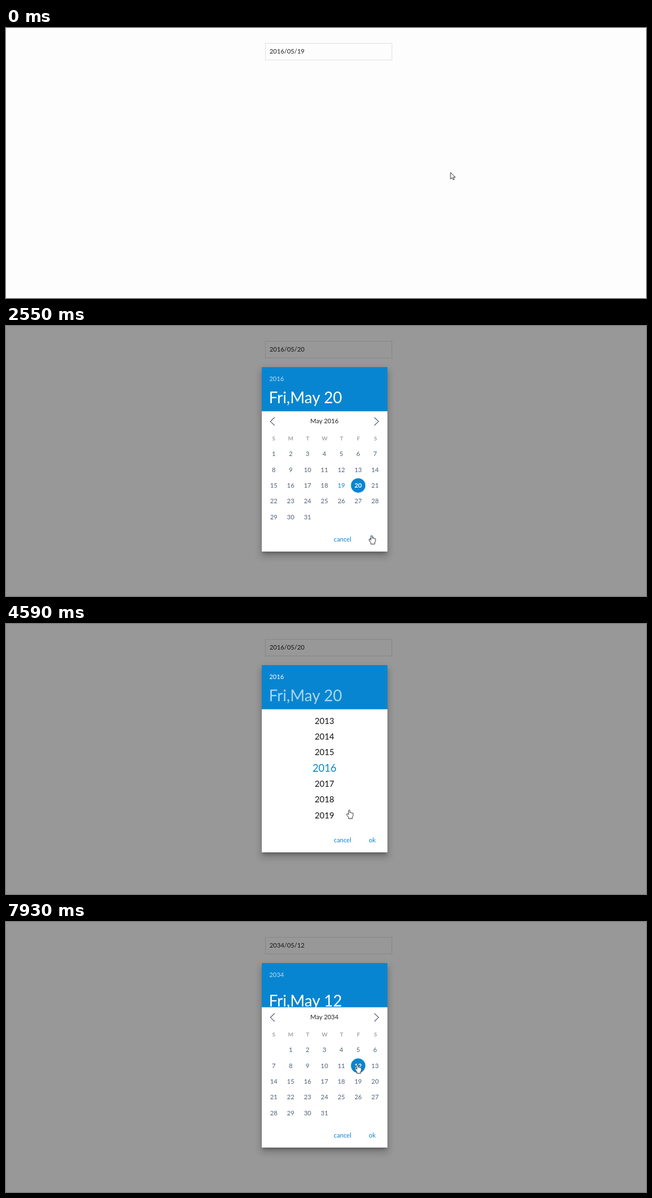
Recreate the animation shown at these times as an HTML page. Size 1151 by 486 pixels, loop 8000 ms.

```html
<!DOCTYPE html>
<html lang="en">
<head>
<meta charset="utf-8">
<title>Date picker</title>
<style>
:root { --blue: #0885d1; --slate: #4d5f7a; }
html, body { margin: 0; width: 100%; height: 100%; overflow: hidden; background: #fdfdfd; }
body { position: relative; font: 11.35px Lato, "Open Sans", sans-serif; }
svg, .layer { position: absolute; left: 0; top: 0; width: 1151px; height: 486px; }
svg text { white-space: pre; }

/* Every track shares one 8 s loop; 1% is 80 ms */
.a { animation: 8s step-end infinite; }
.smooth { animation-timing-function: linear; }

.field { fill: none; stroke: #dfdfdf; }
.focus { fill: none; stroke: #66afe9; animation-name: focus; }
.caret { stroke: #111; animation-name: caret; }
.value { fill: #222; }

.layer { background: rgba(0, 0, 0, .4); animation-name: layer; }
.card {
  position: absolute; left: 460px; top: 74px; width: 226px; height: 332px; background: #fff;
  box-shadow: 0 5px 6px -2px rgba(0, 0, 0, .28), 0 7px 13px 3px rgba(0, 0, 0, .18);
  transform-origin: 112.7px 166px; animation: card 8s linear infinite, height 8s step-end infinite;
}
.card svg { width: 226px; height: 337px; }

.head, .dot { fill: var(--blue); }
.year { fill: #fff; }
.date { font-size: 28.3px; fill: #fff; }
.yearBox { animation-name: yearBox; }
.dateBox { animation-name: dateBox; }

.foot { fill: var(--blue); animation-name: foot; }
.days { animation-name: days; }
.years { animation-name: years; }
.list { animation-name: scroll; }
.list text { font-size: 15px; fill: #111; text-anchor: middle; }
.list .y2016 { font-size: 18.5px; fill: var(--blue); }
.list .y2034 { animation-name: pickYear; }

.chevron { fill: none; stroke: #47536a; stroke-width: 1.1; }
.month text { fill: var(--slate); text-anchor: middle; }
.month .title { fill: #222; }
.month .week { font-size: 10px; font-weight: 700; fill: #a3a3a3; }
.dot { transform-box: fill-box; transform-origin: center; }

.first { animation-name: first; }
.second { animation-name: second; }
.third { animation-name: third; }
.fourth { animation-name: fourth; }
.old { animation-name: old; }
.new { animation-name: new; }

.cursor { animation-name: move; animation-timing-function: ease-in-out; }
.arrow, .hand { fill: #fff; stroke: #222; stroke-linejoin: round; }
.beam { fill: none; stroke: #222; animation-name: beam; }
.arrow { animation-name: arrow; }
.hand { animation-name: hand; }

@keyframes focus { 0%, 23.75%, 54.75% { opacity: 0 } 13.625%, 41.5% { opacity: 1 } }
@keyframes caret { 0%, 20%, 48.5% { opacity: 0 } 13.625%, 41.5% { opacity: 1 } }
@keyframes layer {
  0%, 14% { opacity: 0 } 17.5%, 33.75% { opacity: 1 } 35.75%, 37.12% { opacity: .11 }
  37.125%, 42% { opacity: 0 } 43.375%, 44.87% { opacity: .57 } 44.875% { opacity: .93 } 45.625%, 100% { opacity: 1 }
}
@keyframes card {
  0%, 14% { transform: scale(1.1) } 17.5%, 33.75% { transform: none } 35.75%, 37.12% { transform: scale(1.089) }
  37.125%, 42% { transform: scale(1.1) } 43.375%, 44.87% { transform: scale(1.04) }
  44.875% { transform: scale(1.007) } 45.625%, 100% { transform: none }
}
@keyframes height { 0%, 90% { height: 332px } 54.75% { height: 337px } }
@keyframes foot { 0%, 90% { transform: none } 54.75% { transform: translateY(5px) } }
@keyframes yearBox { 0%, 90% { opacity: .72 } 54.75% { opacity: 1 } }
@keyframes dateBox { 0%, 90% { opacity: 1 } 54.75% { opacity: .66 } }
@keyframes days { 0%, 54.74% { opacity: 1 } 54.75%, 90% { opacity: 0 } 92%, 100% { opacity: 1 } }
@keyframes years { 0%, 54.75% { opacity: 0 } 56.75%, 89.99% { opacity: 1 } 90%, 100% { opacity: 0 } }
@keyframes scroll {
  0%, 60.125% { transform: none; animation-timing-function: ease-in-out }
  64.75%, 100% { transform: translateY(-495.5px) }
}
@keyframes pickYear { 0% { font-size: 15px; fill: #111 } 74.875%, 100% { font-size: 18.5px; fill: var(--blue) } }

@keyframes first { 0% { opacity: 1 } 23.75%, 100% { opacity: 0 } }
@keyframes second { 0%, 74.875% { opacity: 0 } 23.75% { opacity: 1 } }
@keyframes third { 0%, 95.5% { opacity: 0 } 74.875% { opacity: 1 } }
@keyframes fourth { 0% { opacity: 0 } 95.5%, 100% { opacity: 1 } }
@keyframes old { 0% { opacity: 1 } 74.875%, 100% { opacity: 0 } }
@keyframes new { 0% { opacity: 0 } 74.875%, 100% { opacity: 1 } }

/* Header dates: the old one leaves upwards, the next rises from below */
@keyframes date1 {
  0%, 23.75% { transform: none; opacity: 1 } 25.25%, 100% { transform: translateY(-24px); opacity: 0 }
}
@keyframes date2 {
  0%, 24.6% { transform: translateY(30px); opacity: 0 } 24.61% { transform: translateY(30px); opacity: 1 }
  27.5%, 74.875% { transform: none; opacity: 1 } 76.25%, 100% { transform: translateY(-24px); opacity: 0 }
}
@keyframes date3 {
  0%, 75.6% { transform: translateY(30px); opacity: 0 } 75.61% { transform: translateY(30px); opacity: 1 }
  78.2%, 95.75% { transform: none; opacity: 1 } 97.2%, 100% { transform: translateY(-24px); opacity: 0 }
}
@keyframes date4 {
  0%, 97% { transform: translateY(30px); opacity: 0 } 97.01% { transform: translateY(30px); opacity: 1 }
  99.125%, 100% { transform: translateY(12.5px); opacity: 1 }
}

/* Day marks: text, then dot */
@keyframes text19 { 0% { fill: #fff; font-weight: 700 } 23.75%, 100% { fill: var(--blue); font-weight: 400 } }
@keyframes text20 {
  0% { fill: var(--slate); font-weight: 400 } 21.75% { fill: #fff; font-weight: 400 }
  23.75%, 100% { fill: #fff; font-weight: 700 }
}
@keyframes text28 { 0%, 37.125% { fill: var(--slate) } 34.5% { fill: #fff } }
@keyframes textLast { 0% { fill: #fff; font-weight: 700 } 95.5%, 100% { fill: var(--slate); font-weight: 400 } }
@keyframes text12 {
  0% { fill: var(--slate); font-weight: 400 } 94.25% { fill: #fff; font-weight: 400 }
  95.5%, 100% { fill: #fff; font-weight: 700 }
}
@keyframes dot19 { 0%, 23.74% { opacity: 1 } 23.75%, 100% { opacity: 0 } }
@keyframes dot20 { 0%, 22.375% { transform: scale(0) } 23.375%, 100% { transform: none } }
@keyframes dot28 { 0%, 34.5%, 37.125%, 100% { transform: scale(0) } 35%, 37.12% { transform: scale(.36) } }
@keyframes dotLast { 0%, 95.49% { opacity: 1 } 95.5%, 100% { opacity: 0 } }
@keyframes dot12 { 0%, 94.5% { transform: scale(0) } 95.5%, 100% { transform: none } }

@keyframes move {
  0%, 4.875% { transform: translate(799.5px, 260px) }
  11.625%, 18.125% { transform: translate(596px, 38px) }
  21.75%, 25% { transform: translate(631px, 281px) }
  33.125%, 34% { transform: translate(659px, 382px) }
  35.75%, 37.125% { transform: translate(653px, 151px) }
  40.625%, 42.25% { transform: translate(616px, 44px) }
  43.375%, 44.875% { transform: translate(613.5px, 99px) }
  52.5%, 55% { transform: translate(487px, 92px) }
  57.375%, 60.125% { transform: translate(617.5px, 335px) }
  64.75%, 69% { transform: translate(602.5px, 301px) }
  72%, 77.5% { transform: translate(579px, 274px); animation-timing-function: ease-in }
  78.375% { transform: translate(586.5px, 284px); animation-timing-function: ease-out }
  82%, 86% { transform: translate(658px, 378px) }
  89.375%, 91% { transform: translate(590px, 130px) }
  95%, 100% { transform: translate(632.5px, 257px) }
}
@keyframes arrow { 0%, 15%, 34.5% { opacity: 1 } 10.6%, 20.4%, 39.8%, 100% { opacity: 0 } }
@keyframes beam { 0%, 15%, 42.5% { opacity: 0 } 10.6%, 39.8% { opacity: 1 } }
@keyframes hand { 0%, 34.5% { opacity: 0 } 20.4%, 42.5%, 100% { opacity: 1 } }
</style>
</head>
<body>
<svg>
  <rect class="field" x="466.5" y="27.5" width="227.5" height="30"/>
  <rect class="focus a" x="466.5" y="27.5" width="227.5" height="30"/>
  <g class="value">
    <text class="first a" x="474" y="46.2">2016/05/19</text>
    <text class="second a" x="474" y="46.2">2016/05/20</text>
    <text class="third a" x="474" y="46.2">2034/05/20</text>
    <text class="fourth a" x="474" y="46.2">2034/05/12</text>
  </g>
  <path class="caret a" d="M536.5 37V48"/>
</svg>

<div class="layer a smooth">
  <div class="card">
    <svg viewBox="460 74 226 337">
      <clipPath id="headClip"><rect x="460" y="74" width="226" height="79.5"/></clipPath>
      <clipPath id="listClip"><rect x="460" y="153.5" width="226" height="212.5"/></clipPath>
      <rect class="head" x="460" y="74" width="226" height="79.5"/>
      <g class="yearBox a">
        <text class="year old a" x="473.5" y="99.2">2016</text>
        <text class="year new a" x="473.5" y="99.2">2034</text>
      </g>
      <g clip-path="url(#headClip)"><g id="dates" class="dateBox a"></g></g>
      <g class="days a smooth">
        <path class="chevron" d="M483 164.5L475.5 171.8 483 179M662.5 164.5L670 171.8 662.5 179"/>
        <g id="before" class="month old a"></g>
        <g id="after" class="month new a"></g>
      </g>
      <g class="years a smooth" clip-path="url(#listClip)"><g id="list" class="list a smooth"></g></g>
      <g class="foot a"><text x="589.5" y="388.3">cancel</text><text x="652.5" y="388.3">ok</text></g>
    </svg>
  </div>
</div>

<svg>
  <g class="cursor a">
    <path class="arrow a" d="M0 0V12L2.9 9.4 4.9 13.3 6.7 12.4 4.8 8.6H8.5Z"/>
    <path class="beam a" d="M-3 -8H-1L0 -7 1 -8H3M0 -7V7M-3 8H-1L0 7 1 8H3"/>
    <path class="hand a" d="M-1.5 1V8L-3.4 6.6C-5 6.2 -5.4 7.6 -4.4 9L-1.5 13V15.3H5.3V13L6.8 9.5V6C6.8 5 5.3 4.8 5 5.8 4.8 4.6 3.3 4.4 3.1 5.2 2.9 4.2 1.4 4 1.2 4.7V1C1.2 -.4 -1.5 -.4 -1.5 1Z"/>
  </g>
</svg>

<script>
const COL = 30.35, ROW = 28.32;
const byId = id => document.getElementById(id);

function add(parent, tag, attrs, text = '') {
  const el = document.createElementNS('http://www.w3.org/2000/svg', tag);
  for (const key in attrs) el.setAttribute(key, attrs[key]);
  el.textContent = text;
  parent.append(el);
  return el;
}

function track(el, name, smooth) {
  el.classList.add('a');
  if (smooth) el.classList.add('smooth');
  el.style.animationName = name;
}

// marks maps a day to the suffix of its text and dot keyframes
function month(parent, year, marks) {
  const start = new Date(year, 4, 1).getDay();
  add(parent, 'text', { class: 'title', x: 572.7, y: 175 }, 'May ' + year);
  [...'SMTWTFS'].forEach((d, i) => add(parent, 'text', { class: 'week', x: 481.4 + i * 30.5, y: 205.9 }, d));
  for (let day = 1; day <= 31; day++) {
    const cell = start + day - 1;
    const x = 481.6 + cell % 7 * COL;
    const y = 230.3 + Math.floor(cell / 7) * ROW;
    const mark = marks[day];
    if (mark) track(add(parent, 'circle', { class: 'dot', cx: x, cy: y, r: 13 }), 'dot' + mark, true);
    const label = add(parent, 'text', { x, y: y + 4 }, day);
    if (mark) track(label, 'text' + mark);
  }
}

month(byId('before'), 2016, { 19: '19', 20: '20', 28: '28' });
month(byId('after'), 2034, { 12: '12', 20: 'Last' });

['Thu,May 19', 'Fri,May 20', 'Sat,May 20', 'Fri,May 12'].forEach((label, i) =>
  track(add(byId('dates'), 'text', { class: 'date', x: 472.7, y: 139 }, label), 'date' + (i + 1), true));

for (let year = 2010; year <= 2042; year++) {
  const y = 259.2 + (year - 2016) * ROW;
  const big = year === 2016 || year === 2034;
  add(byId('list'), 'text', {
    class: 'y' + year + (year === 2034 ? ' a' : ''), x: 572.7, y: y + (big ? 6.6 : 5.4)
  }, year);
}
</script>
</body>
</html>
```
